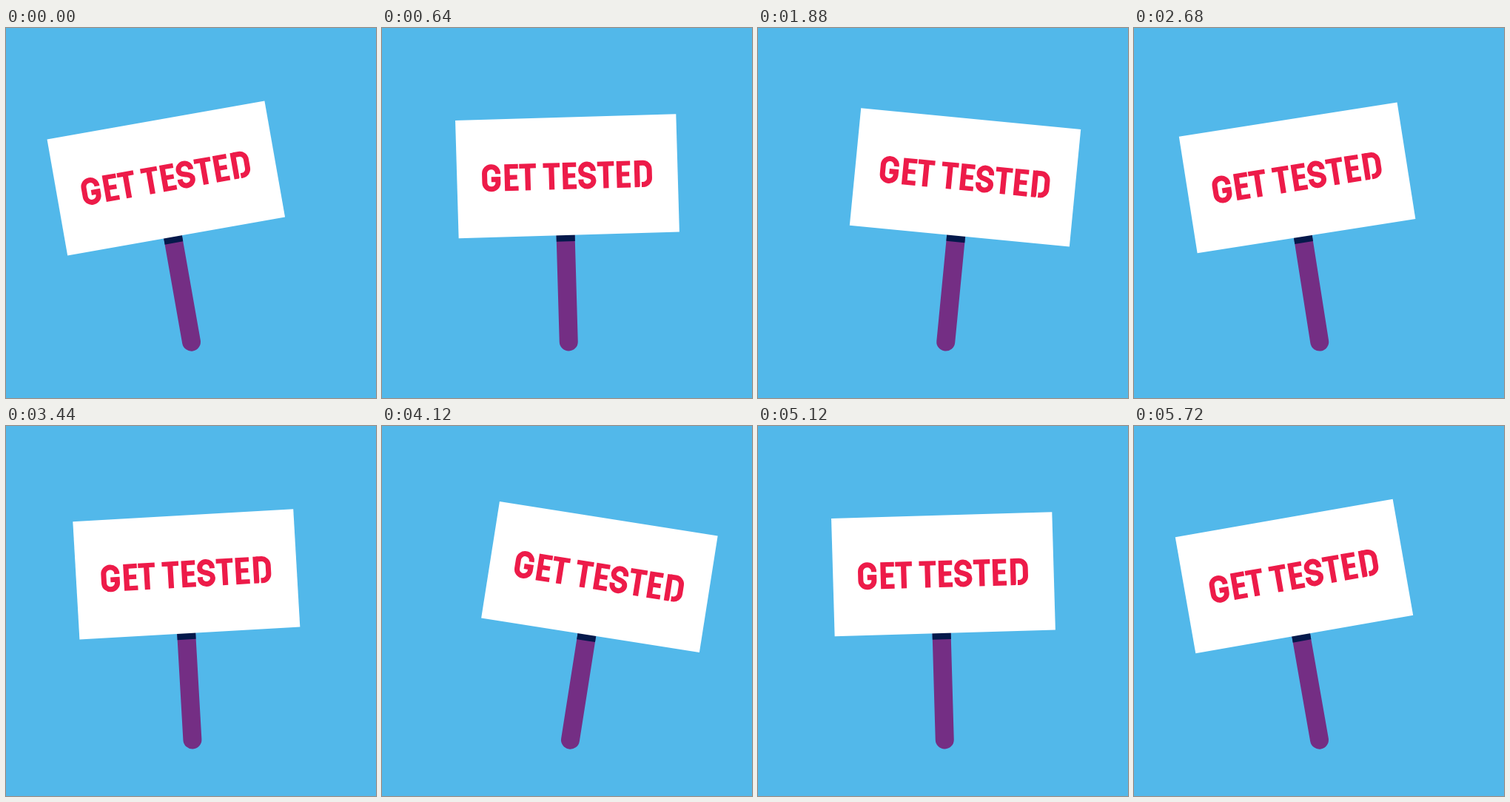
Animation, 500 px wide and 500 px high, one loop 5.76 s. Source, as an HTML page:

```html
<!DOCTYPE html>
<html lang="en">
<head>
<meta charset="utf-8">
<title>Get tested</title>
<style>
  html, body { margin: 0; width: 100%; height: 100%; overflow: hidden; background: #52b8ea; }
  svg { display: block; width: 100vw; height: 100vh; }
  .solid { fill: #ed1b49; }
  .line { fill: none; stroke: #ed1b49; stroke-width: 7; }
</style>
</head>
<body>
<svg viewBox="0 0 500 500" role="img" aria-label="GET TESTED">
  <defs>
    <path id="E" class="solid" d="M0-18h18.5v6.2h-11.3v8.5h9.8v6.1h-9.8v9h11.3v6.2h-18.5z"/>
    <path id="T" class="solid" d="M0-18h22.6v6.2h-7.7v29.8h-7.2v-29.8h-7.7z"/>
    <path id="G" class="line" d="M21.5-5.3V-6.3A9 8.7 0 0 0 3.5-6.3V6.3A9 8.7 0 0 0 21.5 6.3V2H12.5"/>
    <path id="S" class="line" d="M20.3-5.8V-7A8.3 8 0 0 0 3.7-7C3.7-1.5 9-1 12.2 0S20.6 2 20.6 7A8.5 8 0 0 1 3.6 7V5.3"/>
    <g id="D">
      <path class="solid" d="M0-18h7.2v34l-.8 2h-6.4z"/>
      <path class="line" d="M4-14.6H11.5A8.7 8.7 0 0 1 20.2-5.9V5.9A8.7 8.7 0 0 1 11.5 14.6H9.4"/>
    </g>
  </defs>
  <!-- origin of the sign is the pivot at the foot of the stick -->
  <g id="sign">
    <rect x="-12.2" y="-170" width="25" height="170.5" rx="12.5" fill="#742e84"/>
    <rect x="-12.2" y="-158" width="25" height="10.3" fill="#05194b"/>
    <g transform="translate(5 -235.7)">
      <rect x="-149.2" y="-79.7" width="298.4" height="159.4" fill="#fff"/>
      <g id="words" transform="translate(-.3 -.4)"></g>
    </g>
  </g>
</svg>
<script>
  const HALF = 1440, TICK = 40, TILT = 10;
  const sign = document.getElementById('sign');
  const words = document.getElementById('words');

  const letters = [['G', -115], ['E', -84.5], ['T', -64.5], ['T', -32.3], ['E', -6],
                   ['S', 15], ['T', 41], ['E', 67], ['D', 91]];
  for (const [id, x] of letters) {
    const use = document.createElementNS('http://www.w3.org/2000/svg', 'use');
    use.setAttribute('href', '#' + id);
    use.setAttribute('x', x);
    words.append(use);
  }

  const ease = u => u * u * (3 - 2 * u);

  function angleAt(ms) {
    const t = Math.floor(ms / TICK) * TICK % (2 * HALF);
    const swing = ease(t % HALF / HALF);
    return (t < HALF ? 1 : -1) * TILT * (2 * swing - 1);
  }

  function draw(ms) {
    sign.setAttribute('transform', `translate(252.3 436) rotate(${angleAt(ms)})`);
  }

  const start = performance.now();
  function loop() {
    draw(performance.now() - start);
    requestAnimationFrame(loop);
  }
  loop();
</script>
</body>
</html>
```
